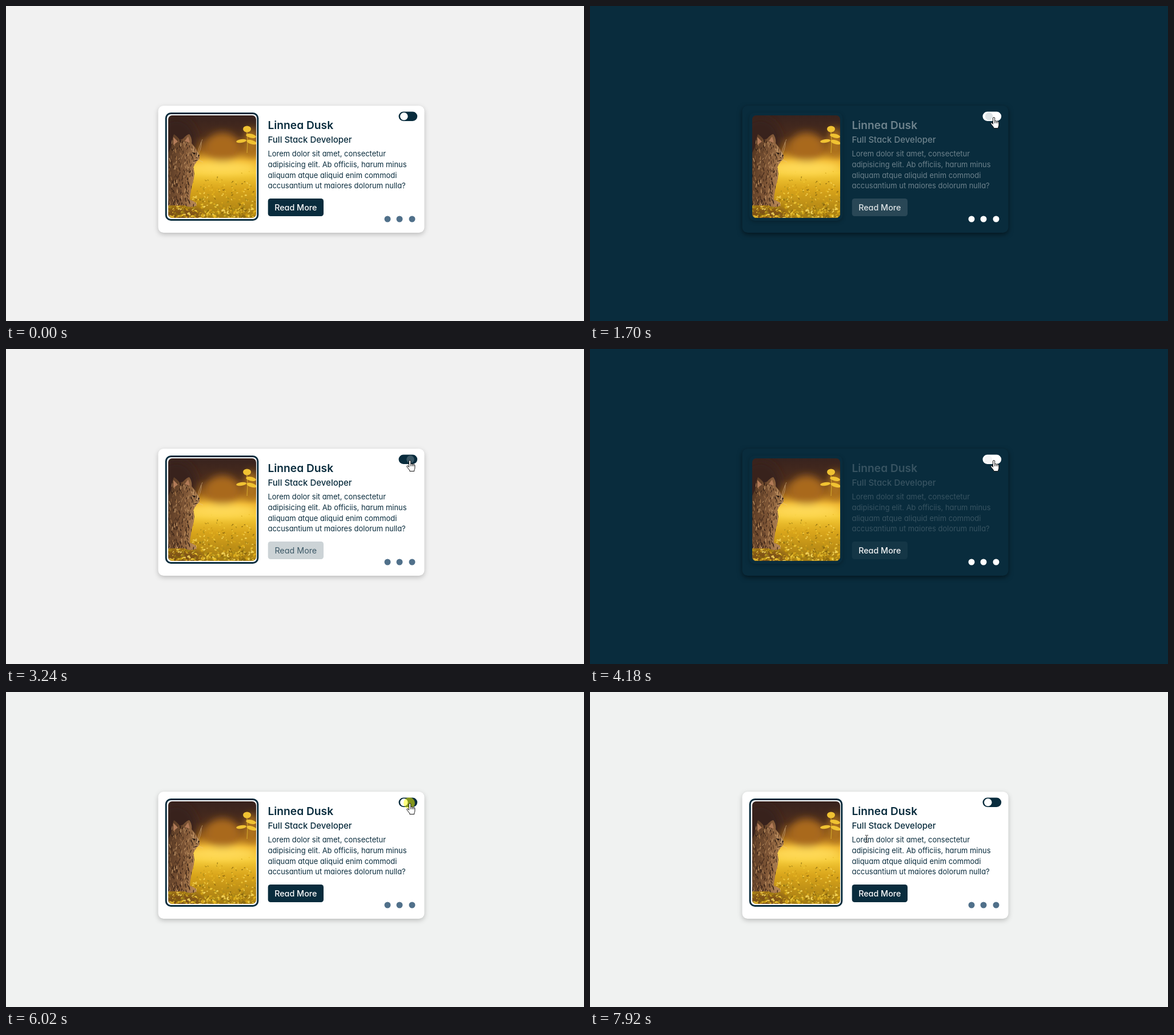
An HTML page that plays this animation: 1012 by 553 pixels, repeating every 7990 ms.

```html
<!DOCTYPE html>
<html lang="en">
<head>
<meta charset="utf-8">
<title>Profile card</title>
<style>
  html, body { margin: 0; width: 100%; height: 100%; overflow: hidden; }
  svg { display: block; width: 100%; height: 100%; }
  text { font-family: Inter, "Open Sans", sans-serif; font-feature-settings: "cv11"; }
  .name { font-size: 19.2px; font-weight: 600; }
  .role { font-size: 15px; font-weight: 500; }
  .bio { font-size: 12.95px; }
  #label { font-size: 14.3px; text-anchor: middle; }
  #card { filter: drop-shadow(0 3px 4px var(--shadow)); }
  #frame { filter: drop-shadow(0 2px 3px var(--frame-shadow)); }
  #cursors path { stroke-linejoin: round; }
</style>
</head>
<body>
<svg viewBox="0 0 1012 553">
  <defs>
    <linearGradient id="meadow" x2="0" y2="1">
      <stop offset="0" stop-color="#38231e"/>
      <stop offset=".2" stop-color="#4b2c1d"/>
      <stop offset=".34" stop-color="#9c611a"/>
      <stop offset=".45" stop-color="#eeb22c"/>
      <stop offset=".56" stop-color="#f6cc38"/>
      <stop offset=".72" stop-color="#d9a51b"/>
      <stop offset="1" stop-color="#a37a12"/>
    </linearGradient>
    <linearGradient id="fur" x2="1" y2=".3">
      <stop offset="0" stop-color="#4f3320"/>
      <stop offset=".6" stop-color="#805737"/>
      <stop offset="1" stop-color="#b88856"/>
    </linearGradient>
    <filter id="soft" x="-50%" y="-50%" width="200%" height="200%"><feGaussianBlur stdDeviation="7"/></filter>
    <clipPath id="photoClip"><rect width="154" height="180" rx="7"/></clipPath>
    <path id="catShape" d="M0 66L5 55Q6 42 10 33Q17 38 20 43L26 41Q33 33 37 33Q42 40 41 49Q49 58 55 70Q56 77 50 81Q46 86 44 91Q48 104 42 122Q38 140 38 148Q50 152 50 158Q40 164 28 158L0 158Z"/>
    <clipPath id="catClip"><use href="#catShape"/></clipPath>
  </defs>

  <rect id="page" width="1012" height="553"/>
  <rect id="card" x="266.5" y="175" width="466" height="223" rx="9.5"/>
  <rect id="frame" x="280.2" y="188.5" width="160.6" height="187" rx="8.5" stroke-width="3"/>

  <g transform="translate(284 192)" clip-path="url(#photoClip)">
    <rect width="154" height="180" fill="url(#meadow)"/>
    <g filter="url(#soft)">
      <ellipse cx="14" cy="45" rx="36" ry="42" fill="#38221a"/>
      <ellipse cx="95" cy="55" rx="30" ry="25" fill="#a9691f"/>
      <ellipse cx="146" cy="48" rx="12" ry="26" fill="#b0741c"/>
      <ellipse cx="92" cy="92" rx="62" ry="11" fill="#ffda58"/>
      <ellipse cx="20" cy="174" rx="42" ry="14" fill="#7a4f12"/>
    </g>
    <g id="grass"></g>
    <g fill="#f0c232">
      <path d="M138 66Q140 40 137 24" fill="none" stroke="#c99a28" stroke-width="1.5"/>
      <ellipse cx="138" cy="24" rx="7" ry="5.5"/>
      <ellipse cx="145" cy="36" rx="9" ry="3.5" transform="rotate(12 145 36)"/>
      <ellipse cx="128" cy="45" rx="9" ry="3" transform="rotate(-8 128 45)"/>
      <ellipse cx="146" cy="47" rx="9" ry="3.5" transform="rotate(18 146 47)"/>
    </g>
    <use href="#catShape" fill="url(#fur)"/>
    <g id="coat" clip-path="url(#catClip)" stroke-linecap="round"></g>
    <path d="M9 38L17 46L9 52ZM35 37L29 45L38 48Z" fill="#b27b58"/>
    <path d="M41 65L48 66L46 69ZM52 69L55 70L53 73ZM42 81Q49 81 53 77" fill="#21140f"/>
    <path d="M49 74Q55 52 60 42M50 73Q58 60 58 47M50 77L61 82" fill="none" stroke="#e4c69b" stroke-width=".5"/>
  </g>

  <g id="copy">
    <text class="name" x="458.5" y="216">Linnea Dusk</text>
    <text class="role" x="458.5" y="239.5">Full Stack Developer</text>
    <g class="bio">
      <text x="458.5" y="264">Lorem dolor sit amet, consectetur</text>
      <text x="458.5" y="283">adipisicing elit. Ab officiis, harum minus</text>
      <text x="458.5" y="301.5">aliquam atque aliquid enim commodi</text>
      <text x="458.5" y="320.3">accusantium ut maiores dolorum nulla?</text>
    </g>
  </g>
  <rect id="button" x="458.7" y="338" width="97.3" height="31" rx="4.5"/>
  <text id="label" x="507.3" y="359">Read More</text>
  <g id="social">
    <circle cx="668" cy="374" r="5.5"/>
    <circle cx="689" cy="374" r="5.5"/>
    <circle cx="711" cy="374" r="5.5"/>
  </g>
  <rect id="track" x="687.5" y="185.5" width="32.7" height="16.5" rx="8.25"/>
  <circle id="knob" cy="193.8" r="6.8"/>
  <circle id="press" cx="706" cy="195" r="10" fill="#ff0" fill-opacity=".5"/>

  <g id="cursors" fill="#fff" stroke="#111" stroke-width="1">
    <path id="arrow" d="M0 0V16.5L3.8 13L6.3 18.8L8.8 17.7L6.3 12H11.6Z"/>
    <path id="hand" d="M-1 12V1.8A1.6 1.6 0 0 1 2.2 1.8V7A1.4 1.4 0 0 1 4.8 7.2A1.4 1.4 0 0 1 7.3 7.8A1.3 1.3 0 0 1 9.4 8.8V13Q9.4 15.5 8.3 17V19.3H.3V17.8L-4.4 11.8Q-5.2 9.8-3.8 9.5Q-2.6 9.7-1 12ZM2.2 7V10.5M4.8 7.4V10.5M7.3 8V10.5"/>
    <path id="beam" fill="none" d="M-2.5-6H-.8L0-5.2L.8-6H2.5M0-5.2V5.7M-2.5 6.5H-.8L0 5.7L.8 6.5H2.5"/>
  </g>
</svg>

<script>
const LOOP = 7990, STEP = 70, FADE = 300;
const NAVY = [9, 44, 61], WHITE = [255, 255, 255];
const $ = id => document.getElementById(id);

// start, time already run at the first step, dark?, page colour
const themes = [
  [-1000, 0, 0, '#f1f1f1'],
  [1700, 75, 1, '#092c3d'],
  [3240, 95, 0, '#f1f1f1'],
  [4180, 45, 1, '#092c3d'],
  [5470, 10, 0, '#f0f2f1'],
  [6150, 60, 1, '#092c3d'],
  [7360, 60, 0, '#f0f2f1']
];
const presses = [[1430, 1700], [3040, 3240], [4050, 4180], [5340, 5470], [6020, 6150], [7230, 7360]];

const mix = (a, b, p) => a + (b - a) * p;
const rgb = (a, b, p) => `rgb(${a.map((v, i) => Math.round(mix(v, b[i], p)))})`;

function bezier(x1, y1, x2, y2) {
  const axis = (a, b, s) => 3 * a * s * (1 - s) ** 2 + 3 * b * s * s * (1 - s) + s ** 3;
  return x => {
    if (x <= 0 || x >= 1) return x <= 0 ? 0 : 1;
    let low = 0, high = 1;
    for (let i = 0; i < 20; i++) {
      const mid = (low + high) / 2;
      if (axis(x1, x2, mid) < x) low = mid; else high = mid;
    }
    return axis(y1, y2, low);
  };
}
const ease = bezier(.25, .1, .25, 1);
const easeInOut = bezier(.42, 0, .58, 1);

function set(el, attrs) {
  for (const key in attrs) el.setAttribute(key, attrs[key]);
}
function add(parent, tag, attrs) {
  const el = document.createElementNS(parent.namespaceURI, tag);
  set(el, attrs);
  parent.append(el);
}

let seed = 7;
const random = () => (seed = seed * 16807 % 2147483647) / 2147483647;
const pick = list => list[Math.floor(random() * list.length)];

function paintPhoto() {
  for (let i = 0; i < 460; i++) {
    const depth = Math.sqrt(random());
    const x = random() * 154, y = 98 + 84 * depth;
    add($('grass'), 'ellipse', {
      cx: x, cy: y, rx: 1 + 2.6 * depth * random(), ry: .7 + 1.4 * depth * random(),
      transform: `rotate(${random() * 120 - 60} ${x} ${y})`, opacity: .75,
      fill: pick(['#f6d23c', '#c99a14', '#86640f', '#e8b71f', '#a98b1a', '#ffe267'])
    });
  }
  for (let i = 0; i < 330; i++) {
    const x = random() * 54, y = 40 + random() * 120;
    add($('coat'), 'path', {
      d: `M${x} ${y}l${random() * 4 - 2} ${2 + random() * 4}`,
      'stroke-width': .7 + random(), opacity: .75,
      stroke: pick(['#2a1912', '#2a1912', '#a9794a', '#5d3d25', '#d0a371'])
    });
  }
}

function drawTheme(t) {
  const [start, head, dark, page] = themes.findLast(theme => t >= theme[0]);
  const x = (head + STEP * Math.floor((t - start) / STEP)) / FADE;
  const slow = dark ? easeInOut(x) : 1 - easeInOut(x);
  const copy = dark ? ease(x) : 0;
  const surface = dark ? page : '#fff';

  set($('page'), { fill: page });
  set($('card'), { fill: surface, style: `--shadow: rgba(0,0,0,${dark ? .5 : .22})` });
  set($('frame'), {
    fill: surface, stroke: dark ? page : rgb(NAVY, NAVY, 0),
    style: `--frame-shadow: rgba(0,0,0,${dark ? .25 : 0})`
  });
  set($('copy'), { fill: rgb(NAVY, WHITE, copy) });
  set($('button'), { fill: rgb(NAVY, WHITE, slow) });
  set($('label'), { fill: rgb(WHITE, NAVY, slow), 'font-weight': slow > .5 ? 400 : 500 });
  set($('social'), { fill: dark ? '#fff' : '#50708a' });
  set($('track'), { fill: dark ? '#fff' : rgb(NAVY, NAVY, 0) });
  set($('knob'), { cx: mix(696.8, 711, slow), fill: rgb(WHITE, NAVY, slow) });
}

function cursorAt(t) {
  if (t < 380) return [];
  if (t < 1210) {
    const p = Math.min(11, Math.floor((t - 380) / 69)) / 11;
    const e = 1 - (1 - p) ** 1.8;
    return ['arrow', mix(902, 706, e), mix(537, 195, e)];
  }
  if (t < 7710) return ['hand', 706.5, 195.3];
  const k = Math.min(4, Math.floor((t - 7640) / STEP));
  const e = easeInOut(k / 4);
  return [k < 4 ? 'arrow' : 'beam', mix(706, 484.5, e), mix(195, 257.5, e)];
}

function draw(t) {
  drawTheme(t);
  set($('press'), { visibility: presses.some(([a, b]) => t >= a && t < b) ? 'visible' : 'hidden' });
  const [shape, x, y] = cursorAt(t);
  for (const el of $('cursors').children) {
    const shown = el.id === shape;
    set(el, { visibility: shown ? 'visible' : 'hidden' });
    if (shown) set(el, { transform: `translate(${x} ${y})` });
  }
}

paintPhoto();
draw(0);
const began = performance.now();
requestAnimationFrame(function tick() {
  draw((performance.now() - began) % LOOP);
  requestAnimationFrame(tick);
});
</script>
</body>
</html>
```
